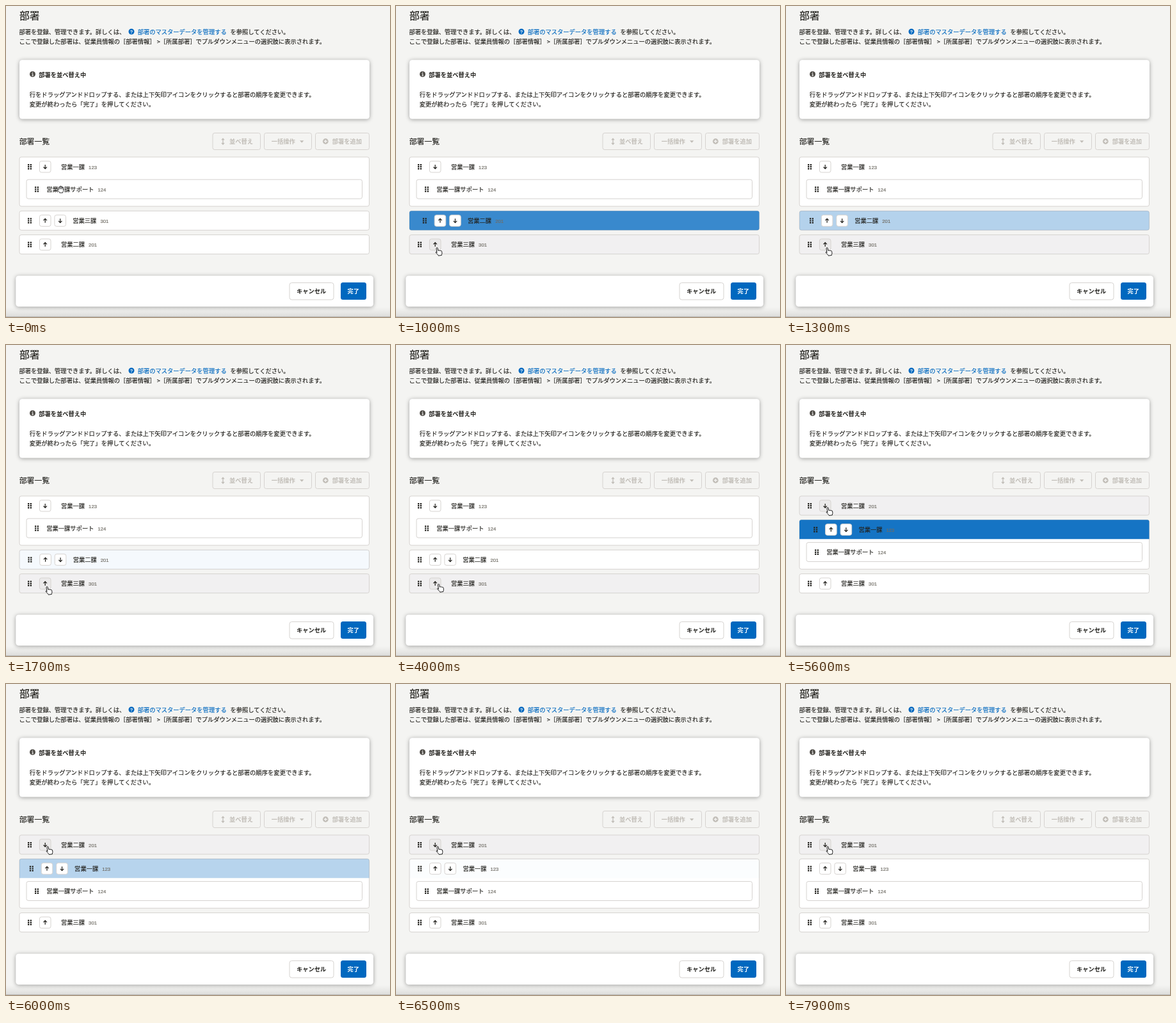
Animation, 600 px wide and 486 px high, one loop 8 s. Source, as an HTML page:

```html
<!DOCTYPE html>
<html lang="ja">
<head>
<meta charset="utf-8">
<title>部署</title>
<style>
  html, body { margin: 0; width: 100%; height: 100%; overflow: hidden; background: #f4f4f2; }
  svg { display: block; width: 600px; height: 486px; }
  text {
    font: 9.28px "Noto Sans CJK JP", "Noto Sans CJK", sans-serif;
    fill: #23221e; stroke: #23221e; stroke-width: .18; white-space: pre;
  }
  .bold { font-weight: 700; stroke: none; }
  .off { font-weight: 700; fill: #c1bdb7; stroke: none; }
  .link { fill: #0068bf; stroke: #0068bf; }
  .info { font-size: 9.34px; }
  .num { font: 7.7px "Liberation Sans", sans-serif; fill: #706d65; stroke: #706d65; }
  .card { fill: #fff; filter: drop-shadow(0 1.5px 3px rgba(0, 0, 0, .36)); }
  .line { stroke: #d6d3d0; fill: #fff; }
  .clear { stroke: #d6d3d0; fill: none; }
</style>
</head>
<body>
<svg viewBox="0 0 600 486">
  <defs>
    <linearGradient id="fade" x2="0" y2="1">
      <stop stop-color="#f4f4f2"/>
      <stop offset="1" stop-color="#dededc"/>
    </linearGradient>
  </defs>
  <rect width="600" height="486" fill="#f4f4f2"/>
  <rect y="471" width="600" height="14" fill="url(#fade)"/>
  <rect y="485" width="600" height="1" fill="#b9b8b6"/>

  <text x="21" y="20.5" style="font-size:15.8px">部署</text>
  <text x="20.5" y="44.3">部署を登録、管理できます。詳しくは、</text>
  <circle cx="196" cy="40" r="4.5" fill="#0068bf"/>
  <text x="196" y="42.7" text-anchor="middle" style="font:700 7.5px 'Liberation Sans',sans-serif;fill:#fff;stroke:none">?</text>
  <text class="link" x="205.7" y="44.3">部署のマスターデータを管理する</text>
  <text x="350.5" y="44.3">を参照してください。</text>
  <text x="20.5" y="59">ここで登録した部署は、従業員情報の［部署情報］ &gt;［所属部署］でプルダウンメニューの選択肢に表示されます。</text>

  <rect class="card" x="21" y="84.3" width="547" height="92.2" rx="4.5"/>
  <circle cx="41.5" cy="106.5" r="4.5" fill="#4d4a45"/>
  <path d="M40.5 105.8h1.3v3M40.3 109h2.6M41 103.9h1.2" stroke="#fff" fill="none"/>
  <text class="bold" x="51.2" y="110.6">部署を並べ替え中</text>
  <text class="info" x="36.7" y="141.8">行をドラッグアンドドロップする、または上下矢印アイコンをクリックすると部署の順序を変更できます。</text>
  <text class="info" x="36.7" y="156.5">変更が終わったら「完了」を押してください。</text>

  <text x="20.7" y="216" style="font-size:11.9px">部署一覧</text>
  <rect class="clear" x="323" y="198.5" width="74.5" height="26" rx="3"/>
  <path d="M339 208v7.4M337 209.4l2-2.2 2 2.2M337 214l2 2.2 2-2.2" stroke="#c1bdb7" stroke-width="1.3" fill="none"/>
  <text class="off" x="349" y="215">並べ替え</text>
  <rect class="clear" x="403.5" y="198.5" width="74" height="26" rx="3"/>
  <text class="off" x="414.7" y="215">一括操作</text>
  <path d="M459 210.2h6.4l-3.2 3.5z" fill="#c1bdb7"/>
  <rect class="clear" x="483.5" y="198.5" width="84" height="26" rx="3"/>
  <circle cx="499.3" cy="211.5" r="4.4" fill="#c1bdb7"/>
  <path d="M496.8 211.5h5M499.3 209v5" stroke="#f4f4f2" stroke-width="1.3"/>
  <text class="off" x="509.7" y="215">部署を追加</text>

  <g id="list"></g>

  <rect class="card" x="15.3" y="421.5" width="558.7" height="48.3" rx="4.5"/>
  <rect class="line" x="443" y="432.5" width="69" height="26.5" rx="3.5"/>
  <text class="bold" x="454" y="449.2">キャンセル</text>
  <rect x="523" y="432" width="40" height="27" rx="3.5" fill="#0068bf"/>
  <text class="bold" x="533.5" y="449.2" style="fill:#fff">完了</text>

  <g id="cursor" fill="#fff" stroke="#111" stroke-width=".9" stroke-linejoin="round">
    <path id="point" transform="translate(.5 .3) rotate(-8)" d="M-1.1 7.6V1a1.1 1.1 0 0 1 2.2 0V4.6q1.7-.8 2 .4q1.5-.6 1.9.5q1.7-.2 1.7 1.3v2.2q0 1.4-1 2.8v.8h-5.2v-.8l-3.2-4.2q-.6-1.2.4-1.4q.5 0 1.2.9z"/>
    <path id="open" transform="scale(.94)" d="M-3.4 1V-2.8a1 1 0 0 1 2 0V-4.3a1 1 0 0 1 2 0V-3.8a1 1 0 0 1 2 0V-2.3a1 1 0 0 1 2 0V2q0 1.6-1.2 3V6h-5.2V5L-5.4 1.6q-.5-1.2.5-1.4q.7 0 1.5.8zM-1.4-2.8V0M.6-4V0M2.6-3.5V0"/>
  </g>
</svg>
<script>
const LOOP = 8000, FLASH = 1200, SHIFT = 10;
const SWAPS = [800, 5490];
const $ = id => document.getElementById(id);

const first = { name: '営業一課', num: 123, sub: { name: '営業一課サポート', num: 124 } };
const second = { name: '営業二課', num: 201 };
const third = { name: '営業三課', num: 301 };
const ORDERS = [[first, third, second], [first, second, third], [second, first, third]];
const MOVED = [null, second, first];

// start, end, target x, target y, sideways bow
const START = [85.4, 286.3];
const MOVES = [
  [120, 720, 63.5, 377.5, 0],
  [3550, 3950, 66, 373.5, 0],
  [4250, 5100, 64.5, 253.8, -11]
];

const clamp = v => Math.min(1, Math.max(0, v));
const smooth = k => k * k * (3 - 2 * k);

// CSS "ease": cubic-bezier(.25, .1, .25, 1)
function ease(x) {
  let lo = 0, hi = 1, s = 0.5;
  const at = (a, b) => 3 * a * s * (1 - s) ** 2 + 3 * b * s * s * (1 - s) + s ** 3;
  for (let i = 0; i < 22; i++) {
    s = (lo + hi) / 2;
    if (at(.25, .25) < x) lo = s; else hi = s;
  }
  return at(.1, 1);
}

function cursorAt(t) {
  let [x, y] = START;
  for (const [from, to, tx, ty, bow] of MOVES) {
    const k = smooth(clamp((t - from) / (to - from)));
    x += (tx - x) * k + bow * Math.sin(Math.PI * k);
    y += (ty - y) * k;
  }
  return [x, y];
}

function grip(x, y) {
  let d = '';
  for (const dx of [-3, .7])
    for (const dy of [-4.2, -1.1, 2]) d += `M${x + dx} ${y + dy}h2.3v2.2h-2.3z`;
  return `<path d="${d}" fill="#23221e"/>`;
}

function arrowButton(x, y, dir, hover) {
  const tip = y + 3.1 * dir, wing = y + .4 * dir;
  return `<rect class="line" x="${x - 8.8}" y="${y - 8.8}" width="17.6" height="17.6" rx="3"
    style="fill:${hover ? '#ebeaea' : '#fff'}"/>
    <path d="M${x} ${y - 3.3 * dir}V${tip}M${x - 2.7} ${wing}L${x} ${tip}L${x + 2.7} ${wing}"
    fill="none" stroke="#23221e" stroke-width="1.25"/>`;
}

function label(x, y, item) {
  const numX = x + item.name.length * 9.28 + 6;
  return `<text x="${x}" y="${y + 3.5}">${item.name}</text>
    <text class="num" x="${numX}" y="${y + 3.3}">${item.num}</text>`;
}

const box = (x, y, w, h, fill) =>
  `<rect class="line" x="${x}" y="${y}" width="${w}" height="${h}" rx="3" style="fill:${fill}"/>`;

function row(item, i, y, glow, [cx, cy]) {
  const mid = y + 15.2, h = item.sub ? 77 : 30;
  const hover = !item.sub && cy > y && cy < y + h;
  let out = box(21, y, 546.5, h, hover ? '#f1f0f1' : '#fff');
  if (glow > 0) {
    const base = item.sub ? `V${y + 30}H21` : `V${y + 27}q0 3-3 3H24q-3 0-3-3`;
    out += `<path d="M21 ${y + 3}q0-3 3-3H564.5q3 0 3 3${base}z" fill="#0068bf" opacity="${glow}"/>`;
  }
  const dirs = i === 0 ? [1] : i === 2 ? [-1] : [-1, 1];
  out += `<g transform="translate(${SHIFT * glow} 0)">` + grip(37, mid);
  dirs.forEach((dir, n) => {
    out += arrowButton(61.2 + 23.5 * n, mid, dir, hover && n === 0 && cx < 71);
  });
  out += label(dirs.length > 1 ? 104.3 : 86, mid, item) + '</g>';
  if (item.sub) {
    out += box(32, y + 35.2, 524.5, 30, '#fff') + grip(48, y + 50.5) + label(63.3, y + 50.5, item.sub);
  }
  return out;
}

function draw(t) {
  const step = SWAPS.filter(s => t > s).length;
  const glow = step ? 1 - ease(clamp((t - SWAPS[step - 1]) / FLASH)) : 0;
  const pos = cursorAt(t);
  let y = 236, overButton = false, html = '';
  ORDERS[step].forEach((item, i) => {
    html += row(item, i, y, item === MOVED[step] && glow > .002 ? glow : 0, pos);
    if (pos[0] > 52 && pos[0] < 71 && Math.abs(pos[1] - y - 15.2) < 9) overButton = true;
    y += item.sub ? 84.3 : 37.3;
  });
  $('list').innerHTML = html;
  $('cursor').setAttribute('transform', `translate(${pos[0]} ${pos[1]})`);
  $('point').style.display = overButton ? '' : 'none';
  $('open').style.display = overButton ? 'none' : '';
}

const begin = performance.now();
function tick() {
  draw((performance.now() - begin) % LOOP);
  requestAnimationFrame(tick);
}
tick();
</script>
</body>
</html>
```
